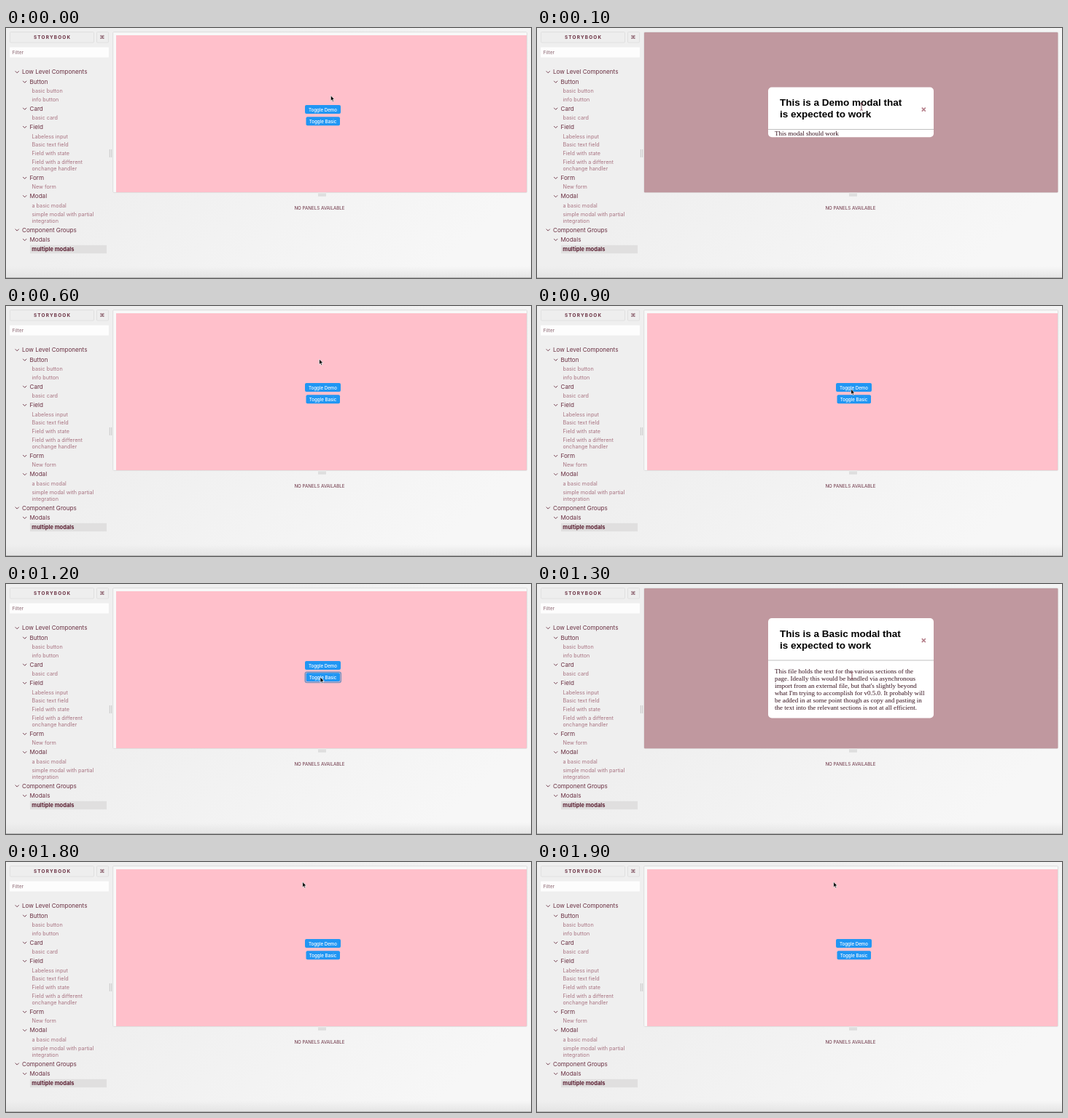
An HTML page that plays this animation: 720 px wide and 344 px high, repeating every 2000 ms.

```html
<!DOCTYPE html>
<html lang="en">
<head>
<meta charset="utf-8">
<title>Modal demo</title>
<style>
  html, body { margin: 0; width: 100%; height: 100%; overflow: hidden; background: #f0f0f0; }
  svg { display: block; width: 720px; height: 344px; }
  text { font-family: Inter, Roboto, sans-serif; fill: #6a3042; white-space: pre; }
  .folder { font-size: 8.1px; }
  .leaf { font-size: 7.22px; fill: #a87381; }
  .active { font-size: 7.5px; font-weight: 700; fill: #5c2133; }
  .chevron { fill: none; stroke: #6a3042; stroke-width: .9; }
  .box { fill: #eeeeee; stroke: #dcdcdc; stroke-width: .8; }
  .grip { stroke: #c4c4c4; stroke-width: .9; }
  .button rect { fill: #2196f3; }
  .button text { font-size: 6.15px; font-weight: 500; fill: #fff; text-anchor: middle; }
  .title { font: 700 13.5px "Liberation Sans", Arial, sans-serif; fill: #000; }
  .body { font: 9px "Liberation Serif", Times, serif; fill: #35101c; }
</style>
</head>
<body>
<svg viewBox="0 0 720 344">
  <defs>
    <linearGradient id="wall" gradientUnits="userSpaceOnUse" x1="250" y1="120" x2="520" y2="400">
      <stop offset="0" stop-color="#efefef"/>
      <stop offset="1" stop-color="#f7f7f7"/>
    </linearGradient>
    <linearGradient id="floor" x2="0" y2="1">
      <stop offset="0" stop-color="#e4e4e4" stop-opacity="0"/>
      <stop offset="1" stop-color="#e4e4e4"/>
    </linearGradient>
  </defs>
  <rect width="720" height="344" fill="url(#wall)"/>
  <rect y="328" width="720" height="16" fill="url(#floor)"/>
  <path d="M0 343.5H720" stroke="#b5b5b5"/>

  <rect class="box" x="5.5" y="5.5" width="115" height="14.5" rx="1"/>
  <rect class="box" x="124.5" y="5.5" width="16" height="14.5" rx="1"/>
  <text x="38" y="15.1" font-size="6.4" font-weight="700" letter-spacing="1.2">STORYBOOK</text>
  <text x="132" y="15" font-size="6.8" text-anchor="middle" style="font-family:'DejaVu Sans',sans-serif">⌘</text>
  <rect x="5" y="26.5" width="136" height="14" rx="1" fill="#fdfdfd"/>
  <text x="8.4" y="35.8" font-size="6.6" style="fill:#8b6570">Filter</text>

  <rect x="33" y="298.8" width="105" height="11.4" fill="#e0dfdf"/>
  <g id="tree"></g>

  <path class="grip" d="M142.3 167v11M144.7 167v11M428 228.6h11M428 230.8h11"/>
  <text x="430" y="249.8" font-size="6.2" text-anchor="middle">NO PANELS AVAILABLE</text>

  <rect x="146.7" y="5.6" width="567.8" height="220.8" rx="1" fill="#f8f8f8" stroke="#d9d9d9" stroke-width=".8"/>
  <g id="page">
    <rect x="151" y="10" width="563" height="216" fill="#ffc0cb"/>
    <g class="button">
      <rect x="410" y="106" width="49" height="12" rx="2"/>
      <text x="434.5" y="114.6">Toggle Demo</text>
    </g>
    <g class="button">
      <rect x="411.5" y="122.3" width="46.5" height="12" rx="2"/>
      <text x="434.6" y="130.8">Toggle Basic</text>
    </g>
    <rect id="focus" x="410.3" y="121.3" width="49" height="14.2" rx="2.5" fill="none" stroke="#7b93bf" stroke-width="1.6"/>
  </g>
  <rect id="overlay" x="147" y="6" width="567.4" height="220.2" rx="1" fill="#c0989f"/>
  <g id="demo"></g>
  <g id="basic"></g>

  <circle id="ring" r="12.4" fill="none" stroke="#000" stroke-width=".9"/>
  <path id="arrow" d="M0 0V7.6L1.7 6L2.8 8.6L4.1 8L3 5.5H5.3Z" stroke="#fff" stroke-width=".7"/>
  <path id="beam" d="M-1.8-4.8Q0-4.8 0-3.6Q0-4.8 1.8-4.8M0-3.6V3.6M-1.8 4.8Q0 4.8 0 3.6Q0 4.8 1.8 4.8" fill="none" stroke="#7d4352" stroke-width=".9"/>
</svg>
<script>
const $ = id => document.getElementById(id);
const label = (cls, x, y, s) => `<text class="${cls}" x="${x}" y="${y}">${s}</text>`;

// Rows: kind (group, folder, leaf, active), vertical centre, label
$('tree').innerHTML = [
  ['g', 60.5, 'Low Level Components'],
  ['f', 74, 'Button'], ['l', 86.5, 'basic button'], ['l', 98.5, 'info button'],
  ['f', 111, 'Card'], ['l', 123.7, 'basic card'],
  ['f', 136.2, 'Field'], ['l', 149, 'Labeless input'], ['l', 160.7, 'Basic text field'],
  ['l', 172.7, 'Field with state'], ['l', 184.6, 'Field with a different'], ['l', 193.6, 'onchange handler'],
  ['f', 206.2, 'Form'], ['l', 218.7, 'New form'],
  ['f', 231.5, 'Modal'], ['l', 244, 'a basic modal'],
  ['l', 256, 'simple modal with partial'], ['l', 265, 'integration'],
  ['g', 277.8, 'Component Groups'],
  ['f', 291.3, 'Modals'], ['a', 304, 'multiple modals']
].map(([kind, y, s]) => {
  if (kind === 'l') return label('leaf', 35.5, y + 2.5, s);
  if (kind === 'a') return label('active', 35.3, y + 2.6, s);
  const x = kind === 'g' ? 22 : 32.5;
  return `<path class="chevron" d="M${x - 9.3} ${y - 1.2}l2.5 2.5l2.5-2.5"/>` + label('folder', x, y + 2.9, s);
}).join('');

function modal(id, top, height, name, lines, firstLine) {
  const mid = top + 30.6;
  $(id).innerHTML =
    `<rect x="317" y="${top}" width="227" height="${height}" rx="5" fill="#fff"/>` +
    `<path d="M317 ${top + 58}h227" stroke="#b9b9b9" stroke-width=".9"/>` +
    `<path d="M527.8 ${mid - 2.5}l5 5m0-5l-5 5" stroke="#b57f8a" stroke-width="1.5"/>` +
    label('title', 333, top + 25.8, `This is a ${name} modal that`) +
    label('title', 333, top + 41.8, 'is expected to work') +
    lines.map((s, i) => label('body', 326, firstLine + i * 10.1, s)).join('');
}
modal('demo', 81.5, 68.7, 'Demo', ['This modal should work'], 148.2);
modal('basic', 47, 137.5, 'Basic', [
  'This file holds the text for the various sections of the',
  'page. Ideally this would be handled via asynchronous',
  'import from an external file, but that\'s slightly beyond',
  'what I\'m trying to accomplish for v0.5.0. It probably will',
  'be added in at some point though as copy and pasting in',
  'the text into the relevant sections is not at all efficient.'
], 122.6);

// Pointer stops: step, x, y
const stops = [
  [0, 445.3, 92.8], [1, 445, 108.5], [5, 429.6, 73], [6, 429.6, 73],
  [10, 431, 128], [12, 431, 128], [13, 432, 126], [17, 407, 27.5], [18, 406.7, 27.3], [20, 406.7, 27.3]
];
function pointer(step) {
  const i = stops.findIndex(s => s[0] > step);
  const [a, x, y] = stops[i - 1], [b, u, v] = stops[i];
  const k = (step - a) / (b - a);
  return [x + (u - x) * k, y + (v - y) * k];
}
const show = (id, on) => $(id).style.display = on ? '' : 'none';

function draw(now) {
  const step = Math.floor(now % 2000 / 100);
  const demo = step >= 1 && step <= 5, basic = step >= 13 && step <= 17;
  const [x, y] = pointer(step);
  const beam = demo && y > 81.5 || basic && y > 47;
  show('overlay', demo || basic);
  show('demo', demo);
  show('basic', basic);
  show('focus', step === 12);
  show('ring', step === 5 || step === 17);
  show('beam', beam);
  show('arrow', !beam);
  for (const id of ['ring', 'beam', 'arrow']) $(id).setAttribute('transform', `translate(${x} ${y})`);
}
const start = performance.now();
function tick() {
  draw(performance.now() - start);
  requestAnimationFrame(tick);
}
tick();
</script>
</body>
</html>
```
